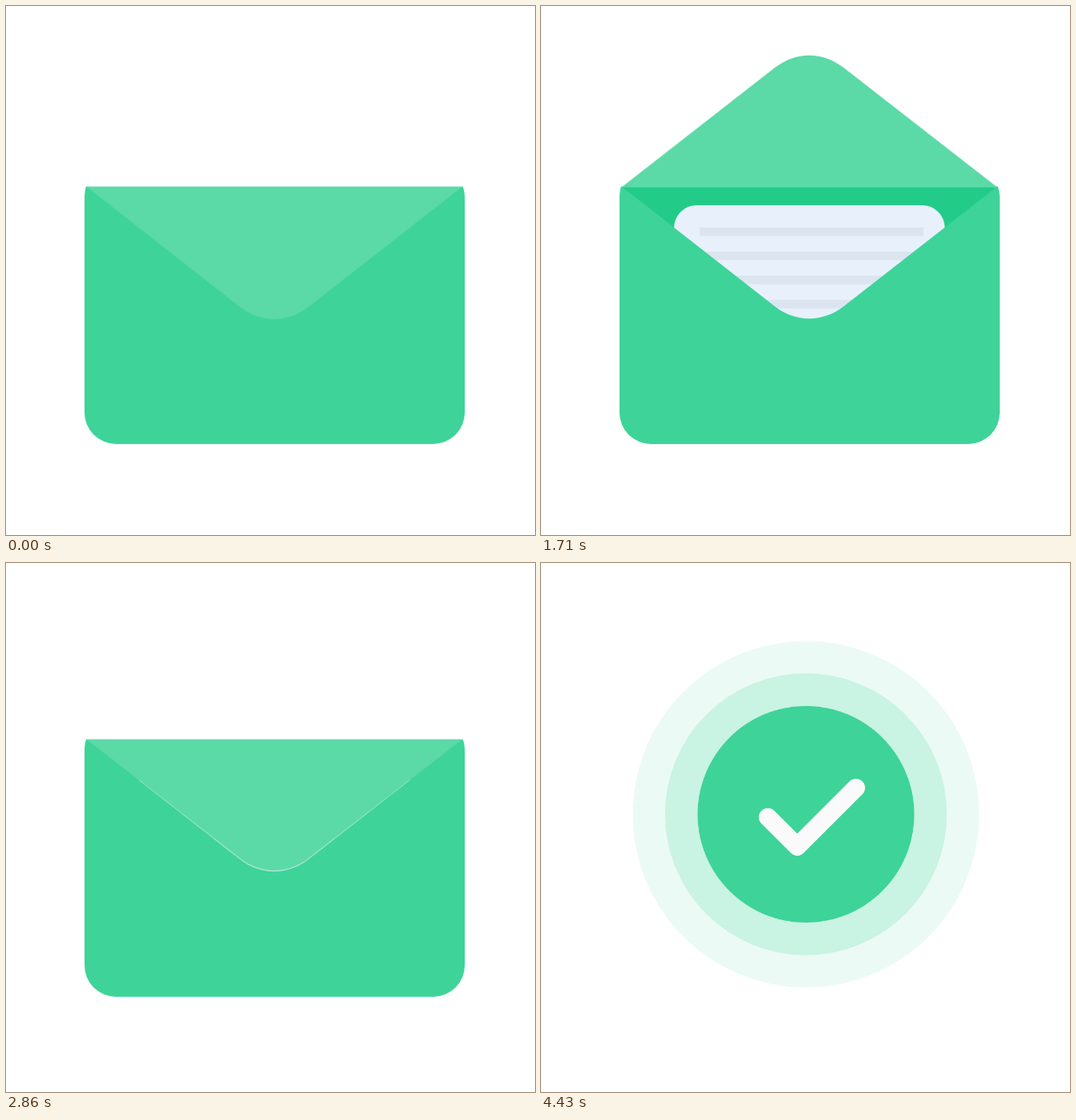
These frames come from a looping animation (640x640 px, 4780 ms). An HTML page:

```html
<!DOCTYPE html>
<html lang="en">
<head>
<meta charset="utf-8">
<title>Message sent</title>
<style>
  html, body { margin: 0; width: 100%; height: 100%; overflow: hidden; background: #fff; }
  svg { display: block; width: 100%; height: 100%; }
  svg * { transform-box: view-box; }

  .move { animation: 4780ms linear infinite; }
  .mail { transform-origin: 325px 374px; animation-name: mail; }
  .jump { animation-name: jump; }
  .flap { transform-origin: 325px 219px; fill: #5bd9a7; animation-name: flap; }
  .paper { animation-name: paper; }
  .badge { animation-name: badge; fill: #3ed399; }
  .ring { transform-origin: 320.5px 304px; animation-name: ring; }
  .ring.inner { animation-name: ring-inner; }
  .check { transform-origin: 310px 232px; animation-name: check; }

  @keyframes mail {
    0%, 65.9% { transform: none; animation-timing-function: ease-in; }
    71.13%, 100% { transform: scale(0); }
  }

  /* Two identical hops, then rest */
  @keyframes jump {
    0%, 37.45% { transform: none; animation-timing-function: cubic-bezier(.43, 0, .8, 1); }
    12.97%, 50.42% { transform: translateY(-52px); animation-timing-function: cubic-bezier(.33, 0, .56, 1); }
    25.31%, 62.76%, 100% { transform: none; }
  }

  @keyframes flap {
    0%, 11.92% { transform: scaleY(-1.005); animation-timing-function: cubic-bezier(.4, 0, .5, 1); }
    23.01% { transform: scaleY(1.012); animation-timing-function: ease-in-out; }
    33.5%, 37.45% { transform: none; animation-timing-function: ease-in-out; }
    46.23%, 48.33% { transform: scaleY(1.025); animation-timing-function: cubic-bezier(.4, 0, .44, 1); }
    60.67%, 100% { transform: scaleY(-1.005); }
  }

  @keyframes paper {
    0%, 18.2% { transform: translateY(-217px); animation-timing-function: cubic-bezier(.3, 0, .67, 1); }
    36.4%, 37.45% { transform: translateY(242.6px); animation-timing-function: cubic-bezier(.43, 0, .8, .8); }
    46.23% { transform: translateY(198px); animation-timing-function: ease-out; }
    49.37% { transform: translateY(192px); animation-timing-function: ease-in-out; }
    56.49%, 100% { transform: translateY(243px); }
  }

  @keyframes badge {
    0%, 66.5% { transform: translate(325px, 374px) scale(0); animation-timing-function: cubic-bezier(.33, 0, .67, 1); }
    73.22% { transform: translate(348px, 319.5px) scale(2.215); animation-timing-function: cubic-bezier(.33, 0, .67, .8); }
    79.29% { transform: translate(324px, 291px) scale(1.425); animation-timing-function: ease-out; }
    82.85%, 100% { transform: translate(320.5px, 304px) scale(1.31); }
  }

  @keyframes ring {
    0%, 79.29% { transform: scale(0); }
    79.3% { transform: scale(.62); animation-timing-function: cubic-bezier(.4, 0, .38, 1); }
    92.68%, 100% { transform: none; }
  }

  @keyframes ring-inner {
    0%, 79.29% { transform: scale(0); }
    79.3% { transform: scale(.76); animation-timing-function: cubic-bezier(.4, 0, .38, 1); }
    92.68%, 100% { transform: none; }
  }

  @keyframes check {
    0%, 69% { transform: scale(0); animation-timing-function: ease-in-out; }
    74.48% { transform: scale(1.8); animation-timing-function: cubic-bezier(.33, 0, .67, .8); }
    79.29% { transform: scale(1.28); animation-timing-function: ease-out; }
    82.85%, 100% { transform: none; }
  }
</style>
</head>
<body>
<svg viewBox="0 0 640 640">
  <defs>
    <clipPath id="slot"><rect x="90" y="38" width="470" height="500" transform="translate(0 5)"/></clipPath>
    <clipPath id="below"><rect x="90" y="218.5" width="470" height="200"/></clipPath>
    <path id="flap" d="M97.5 219.2 L283 74.5 C308.5 54.7 340.5 54.7 366 74.5 L552 219.2 Z"/>
    <g id="line"><rect x="192" y="27" width="271" height="10.2"/></g>
  </defs>

  <g class="move mail">
    <g class="move jump">
      <path fill="#22cc88" d="M98 219 H552 L400 400 H250 Z"/>
      <use href="#flap" class="move flap"/>
      <g clip-path="url(#slot)">
        <g class="move paper">
          <rect x="161" width="327.5" height="260" rx="27" fill="#e8f0fb"/>
          <g id="lines" fill="#dbe5f0"></g>
        </g>
      </g>
      <path fill="#3ed399" d="M97 218 L283 363.5 C308.5 383 340.5 383 366 363.5 L552.5 218
        Q555 224 555 233 V492 A38 38 0 0 1 517 530 H133 A38 38 0 0 1 95 492 V233 Q95 224 97 218 Z"/>
      <g clip-path="url(#below)"><use href="#flap" class="move flap"/></g>
    </g>
  </g>

  <circle class="move ring" cx="320.5" cy="304" r="209.5" fill="#ebfaf5"/>
  <circle class="move ring inner" cx="320.5" cy="304" r="170.5" fill="#c9f3e3"/>
  <circle class="move badge" r="100"/>
  <polyline class="move check" points="274.5,307.5 310,343 381,272" fill="none" stroke="#fafafa"
    stroke-width="22" stroke-linecap="round" stroke-linejoin="round"/>
</svg>
<script>
  const lines = document.getElementById('lines');
  const line = document.getElementById('line').firstElementChild;
  for (let i = 0; i < 8; i++) {
    const copy = line.cloneNode();
    copy.setAttribute('y', 27 + i * 29.15);
    lines.append(copy);
  }
</script>
</body>
</html>
```
